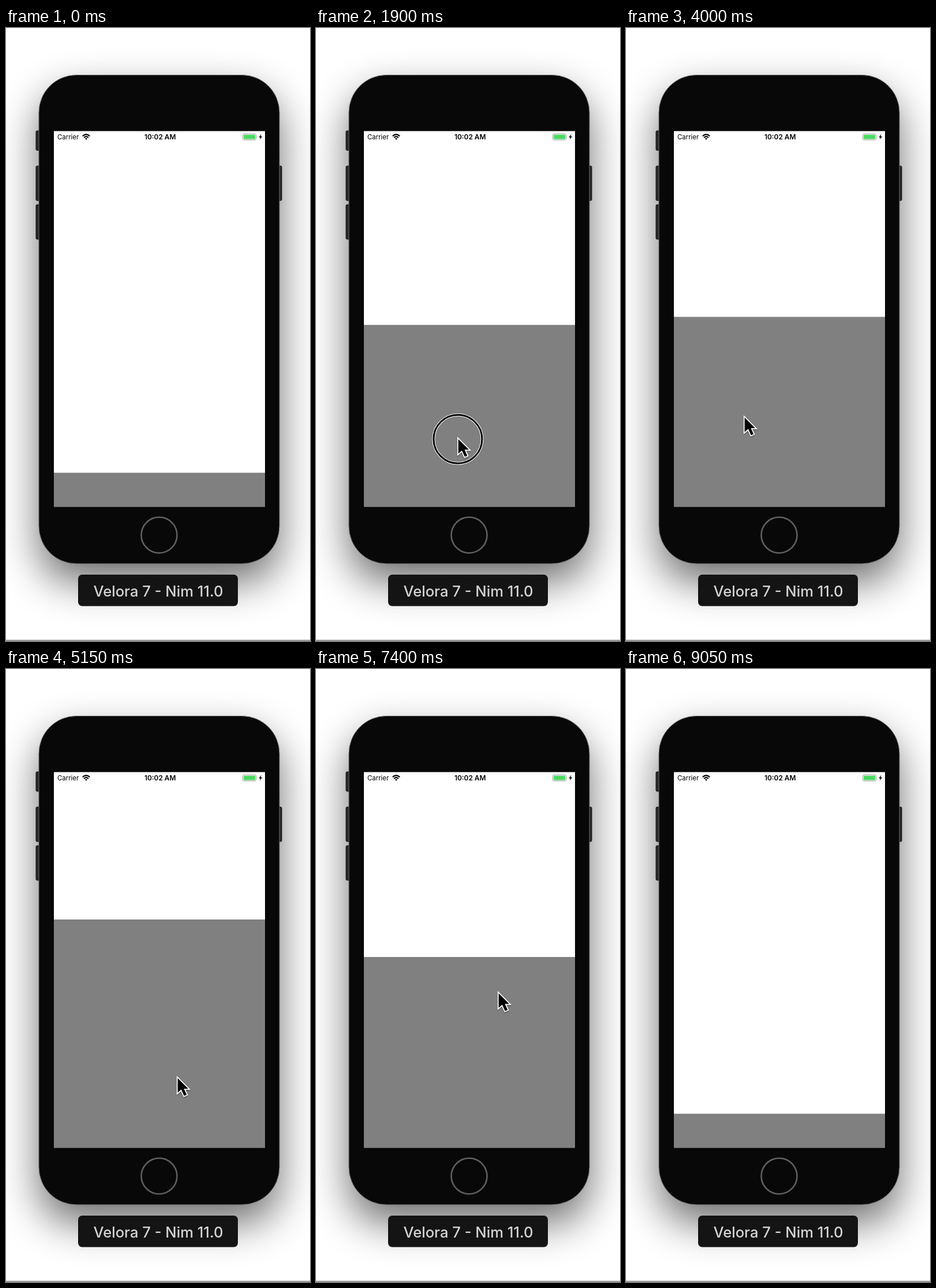
An HTML page that plays this animation: 527x1062 px, repeating every 9650 ms.

```html
<!DOCTYPE html>
<html lang="en">
<head>
<meta charset="utf-8">
<title>Drawer demo</title>
<style>
  html, body { margin: 0; width: 100%; height: 100%; overflow: hidden; background: #fff; }
  svg { display: block; width: 527px; height: 1062px; }
  text { font-family: Inter, Roboto, sans-serif; }
</style>
</head>
<body>
<svg viewBox="0 0 527 1062" xmlns="http://www.w3.org/2000/svg">
  <defs>
    <filter id="soft" x="-40%" y="-30%" width="180%" height="160%">
      <feGaussianBlur stdDeviation="35"/>
    </filter>
    <filter id="lift" x="-50%" y="-50%" width="200%" height="200%">
      <feDropShadow dx="0" dy="1.5" stdDeviation="1.3" flood-opacity=".35"/>
    </filter>
  </defs>

  <rect width="527" height="1062" fill="#fff"/>
  <rect x="57" y="113" width="417" height="847" rx="65" opacity=".57" filter="url(#soft)"/>
  <rect y="1060" width="527" height="1.5" fill="#777"/>

  <g fill="#282828" stroke="#111">
    <rect x="52" y="178" width="9" height="34" rx="2"/>
    <rect x="52" y="239" width="9" height="60" rx="2"/>
    <rect x="52" y="306" width="9" height="60" rx="2"/>
    <rect x="469" y="239" width="9" height="60" rx="2"/>
  </g>
  <rect x="57" y="81.5" width="417" height="846.5" rx="65" fill="#080808" stroke="#6f686a"/>
  <circle cx="265.5" cy="878.5" r="31" fill="none" stroke="#606060" stroke-width="2.6"/>

  <rect x="83" y="178.6" width="366" height="650.7" fill="#fff"/>
  <rect id="drawer" x="83" width="366" fill="#808080"/>

  <text x="89" y="193" font-size="11.4">Carrier</text>
  <text x="267.2" y="193" font-size="11.9" font-weight="600" text-anchor="middle">10:02 AM</text>
  <g fill="none" stroke="#000" stroke-width="2.2">
    <path d="M132.8 187.3 Q139 181.6 145.2 187.3"/>
    <path d="M135.2 190 Q139 186.4 142.8 190"/>
    <path d="M139 193.8 L136.9 191.6 Q139 190 141.1 191.6 Z" fill="#000" stroke="none"/>
  </g>
  <rect x="410.5" y="183.5" width="23" height="10.4" rx="2" fill="#fff" stroke="#999"/>
  <rect x="412" y="185" width="20" height="7.4" rx=".8" fill="#4cd964"/>
  <path d="M434.8 187 q1.6 1.7 0 3.4z" fill="#999"/>
  <path d="M442.6 183.6 L438.2 189.4 H440.9 L439.8 193.6 L444.2 187.8 H441.5 Z"/>

  <rect x="125" y="947" width="277" height="54.5" rx="7" fill="#141414"/>
  <text x="264" y="985" font-size="25.6" font-weight="500" fill="#d4d4d4" text-anchor="middle">Velora 7 - Nim 11.0</text>

  <g id="pointer">
    <g id="touch" fill="none">
      <circle cx=".8" cy="3.8" r="42" stroke="#fff" stroke-width="5"/>
      <circle cx=".8" cy="3.8" r="42" stroke="#000" stroke-width="3"/>
    </g>
    <path d="M1.6 3.8 V29 L7.8 23.6 L12.8 34.4 L17.2 32.5 L12.4 22.2 H20 Z" fill="#000"
      stroke="#fff" stroke-width="3.4" paint-order="stroke" filter="url(#lift)"/>
  </g>
</svg>
<script>
const LOOP = 9650, STEP = 50;
const CLOSED = 770.5, OPEN = 341.5, BOTTOM = 829.3;
const el = id => document.getElementById(id);
const drawer = el('drawer'), pointer = el('pointer'), touch = el('touch');

// Drawer moves: how far it is open at the end, and how long the finger holds.
// The hold follows the start of an opening and precedes a closing.
const moves = [
  { from: 1550, to: 2100, open: .688, hold: 550 },
  { from: 2100, to: 3300, open: 0, hold: 0 },
  { from: 3550, to: 4700, open: 1, hold: 400 },
  { from: 5020, to: 5300, open: 0, hold: 320 },
  { from: 5500, to: 6450, open: 1, hold: 970 },
  { from: 6420, to: 6750, open: .03, hold: 0 },
  { from: 7070, to: 7700, open: .81, hold: 280 },
  { from: 7850, to: 8900, open: 0, hold: 100 }
];

// Pointer glides: when each begins and ends, and where it leads
const glides = [
  { from: 400, to: 800, x: 187, y: 824 },
  { from: 950, to: 1350, x: 256, y: 784 },
  { from: 1600, to: 2100, x: 243, y: 694 },
  { from: 2550, to: 3300, x: 216, y: 792 },
  { from: 3550, to: 4000, x: 204, y: 671 },
  { from: 4600, to: 5150, x: 296, y: 705 },
  { from: 5150, to: 5450, x: 300, y: 790 },
  { from: 5550, to: 6450, x: 302, y: 486 },
  { from: 6450, to: 6750, x: 306, y: 718 },
  { from: 7000, to: 7400, x: 315, y: 558 },
  { from: 7850, to: 8800, x: 503, y: 830 },
  { from: 8800, to: 9050, x: 503, y: 946 }
];

const progress = (m, t) => Math.min(1, Math.max(0, (t - m.from) / (m.to - m.from)));
const easeOut = u => u * (2 - u);
const easeIn = u => u * u;

// Opening slows down; closing runs the same curve backwards.
function openness(t) {
  let now = 0;
  for (const m of moves) {
    if (t < m.from) break;
    const ease = m.open > now ? easeOut : easeIn;
    now += (m.open - now) * ease(progress(m, t));
  }
  return now;
}

function tip(t) {
  let x = -24, y = 944;
  for (const g of glides) {
    const u = easeOut(progress(g, t));
    x += (g.x - x) * u;
    y += (g.y - y) * u;
  }
  return `${x} ${y}`;
}

function pressed(t) {
  return moves.some(({ from, open, hold }) =>
    open > .5 ? t >= from && t < from + hold : t >= from - hold && t < from);
}

const show = (node, on) => node.style.display = on ? '' : 'none';

function draw(t) {
  const top = CLOSED + (OPEN - CLOSED) * openness(t);
  drawer.setAttribute('y', top);
  drawer.setAttribute('height', BOTTOM - top);
  pointer.setAttribute('transform', `translate(${tip(t)})`);
  show(pointer, t >= 450 && t < 9050);
  show(touch, pressed(t));
}

const start = performance.now();
function tick() {
  const t = (performance.now() - start) % LOOP;
  draw(Math.floor(t / STEP) * STEP);
  requestAnimationFrame(tick);
}
draw(0);
requestAnimationFrame(tick);
</script>
</body>
</html>
```
